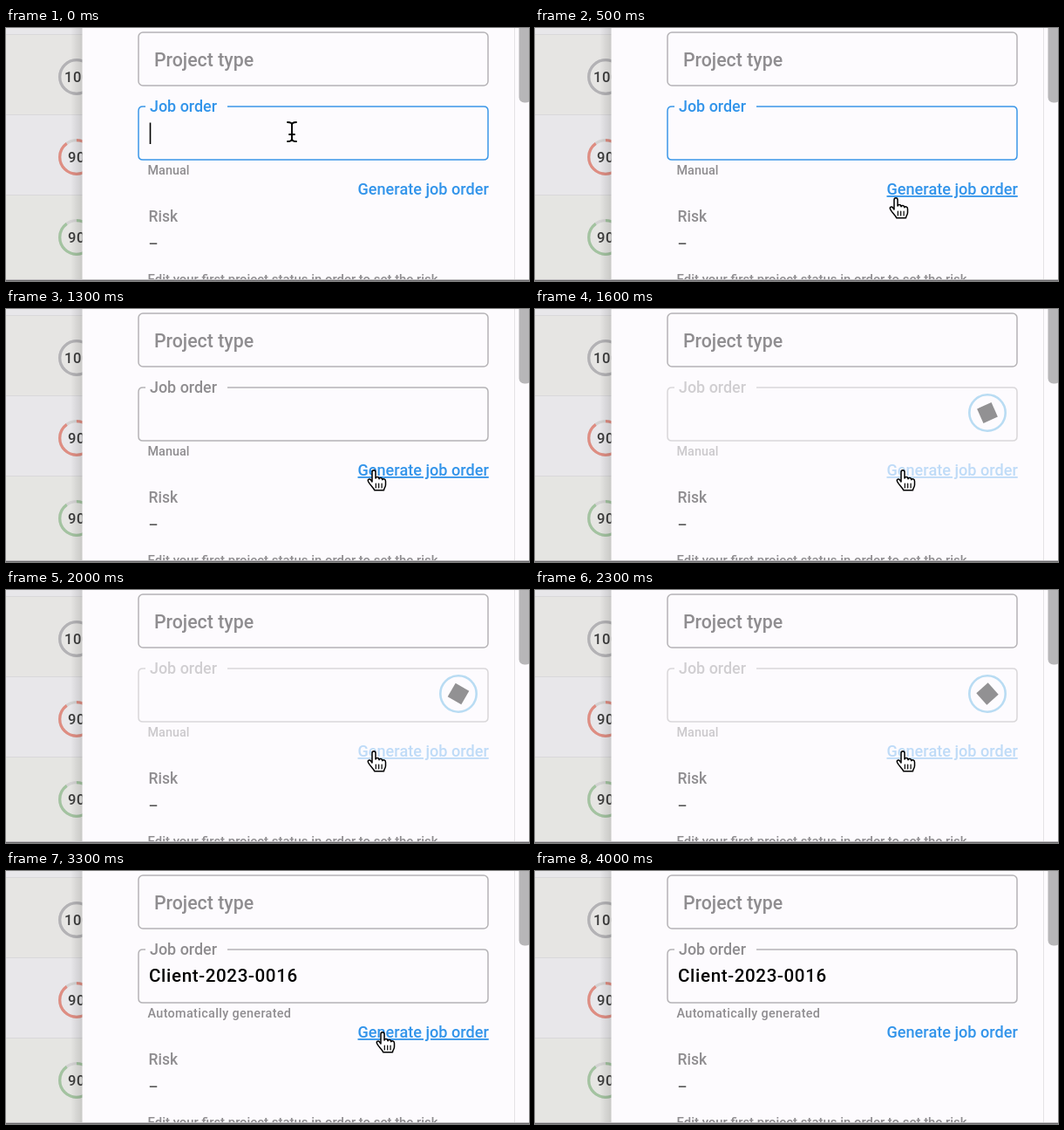
An HTML page that plays this animation: 600x290 px, repeating every 4.2 s.

```html
<!DOCTYPE html>
<html lang="en">
<head>
<meta charset="utf-8">
<title>Generate job order</title>
<style>
  html, body { margin: 0; width: 100%; height: 100%; overflow: hidden; background: #fdfbfe; }
  svg { display: block; width: 600px; height: 290px; font-family: Roboto, sans-serif; font-weight: 500; }
  text { white-space: pre; }
  .grey { fill: #8f8d90; }
  .box { fill: none; stroke: #b5b3b6; stroke-width: 1.5; }
  .ring { fill: none; stroke-width: 3.2; }
  .score { font-size: 16.5px; fill: #3c3c3c; letter-spacing: .6px; }
  #link { font-size: 18.1px; fill: #3294ea; text-decoration-thickness: 1.3px; text-underline-offset: 2px; }
  .focus #outline { stroke: #3b97e8; }
  .focus #label { fill: #3294ea; }
</style>
</head>
<body>
<svg viewBox="0 0 600 290">
  <defs>
    <linearGradient id="shade">
      <stop offset="0" stop-color="#000" stop-opacity="0"/>
      <stop offset="1" stop-color="#000" stop-opacity=".13"/>
    </linearGradient>
  </defs>

  <rect width="88" height="290" fill="#e8e7ea"/>
  <rect y="7" width="88" height="92" fill="#e6e5e3"/>
  <rect y="192" width="88" height="98" fill="#e5e5e2"/>
  <path d="M0 7.5H88M0 99.5H88M0 191.5H88" stroke="#d9d8da"/>
  <g id="scores"></g>
  <rect x="74" width="14" height="290" fill="url(#shade)"/>

  <rect x="87.5" width="513" height="290" fill="#fdfbfe"/>
  <path d="M583.5 0V290" stroke="#e4e2e5"/>
  <rect x="588.5" y="-10" width="14" height="95.5" rx="6" fill="#b7b6b8"/>

  <rect class="box" x="152" y="5" width="401" height="61" rx="5"/>
  <text class="grey" x="170" y="44" font-size="21.3">Project type</text>

  <g id="field">
    <path id="outline" class="box" d="M160 90H157Q152 90 152 95V146Q152 151 157 151H548Q553 151 553 146V95Q553 90 548 90H254"/>
    <text id="label" class="grey" x="165" y="95.5" font-size="17.9">Job order</text>
    <path id="caret" d="M165.5 108.5V133" stroke="#000" stroke-width="1.6"/>
    <text id="value" x="164" y="127" font-size="20.6" letter-spacing=".65">Client-2023-0016</text>
  </g>
  <text id="helper" class="grey" x="162.5" y="168" font-size="14.4"></text>
  <text id="link" x="403.5" y="191">Generate job order</text>

  <g id="spinner" transform="translate(519 119)">
    <circle r="20.7" fill="none" stroke="#b9dcf3" stroke-width="2.6"/>
    <rect id="mark" x="-9" y="-9" width="18" height="18" fill="#929193"/>
  </g>

  <text class="grey" x="163.5" y="222" font-size="17.5">Risk</text>
  <text x="163.5" y="253" font-size="17" fill="#555">–</text>
  <text class="grey" x="162.5" y="293" font-size="14.9">Edit your first project status in order to set the risk</text>
  <rect y="288" width="600" height="1" fill="#bdbbbe"/>
  <rect y="289" width="600" height="1" fill="#69686a"/>

  <g id="cursors" stroke-linejoin="round" stroke-linecap="round">
    <g id="beam" fill="none">
      <path d="M-5 -11Q0 -11 0 -8Q0 -11 5 -11M0 -8V8M-5 11Q0 11 0 8Q0 11 5 11M-3 3H3" stroke="#fff" stroke-width="4"/>
      <path d="M-5 -11Q0 -11 0 -8Q0 -11 5 -11M0 -8V8M-5 11Q0 11 0 8Q0 11 5 11M-3 3H3" stroke="#000" stroke-width="1.9"/>
    </g>
    <path id="arrow" d="M0 0V17L4 13.3L6.8 19.5L9.6 18.2L6.9 12.2H12.2Z" stroke="#fff" stroke-width="1.4"/>
    <g id="hand" stroke="#000" stroke-width="1.5">
      <path fill="#fff" d="M-2 2C-2 -1 2 -1 2 2V9C2.5 7 6 7 6 9.7C6.5 8 9.8 8 9.8 10.8C10.5 9.3 13.5 9.5 13.5 12.5V16.5C13.5 19.5 11.5 20 11.5 22.7H.8C0 20 -4.7 16.5 -6.4 12.7C-7.5 10 -4.7 9 -3.4 11L-2 13Z"/>
      <path d="M2.3 15V20M5.7 15V20M9.1 15V20" stroke-width="1.2"/>
    </g>
  </g>
</svg>

<script>
const LOOP = 4200, STEP = 100;
const el = id => document.getElementById(id);

// Cursor poses: [step, shape, x, y]; positions are interpolated linearly between rows.
const path = [
  [0, 'beam', 328, 119], [1, 'beam', 333, 124], [2, 'beam', 349, 141],
  [3, 'arrow', 372, 168], [4, 'arrow', 399, 198], [5, 'hand', 414, 195],
  [6, 'hand', 419, 188], [8, 'hand', 421, 179], [10, 'hand', 421, 179],
  [12, 'hand', 422, 185], [32, 'hand', 422, 185], [33, 'hand', 432, 185],
  [34, 'hand', 456, 184], [35, 'hand', 488, 182], [36, 'hand', 520, 179],
  [37, '', 540, 176], [42, '', 540, 176]
];

const scores = [['100', -14, 56, '#b3b2b5', 1], ['90', -10, 148, '#df8d82', .9], ['90', -10, 240, '#a3c3a0', .9]];
el('scores').innerHTML = scores.map(([text, x, y, color, part]) => `
  <g transform="translate(81 ${y})">
    <circle class="ring" r="19.3" stroke="#d3d2d2"/>
    <circle class="ring" r="19.3" stroke="${color}" pathLength="100"
      stroke-dasharray="${part * 100} 100" transform="rotate(-90)"/>
    <text class="score" x="${x}" y="6">${text}</text>
  </g>`).join('');

const show = (id, on) => { el(id).style.display = on ? '' : 'none'; };
const clamp = v => Math.min(1, Math.max(0, v));

function drawCursor(n) {
  const i = path.findIndex((row, k) => k === path.length - 1 || n < path[k + 1][0]);
  const [start, shape, x, y] = path[i];
  const [end, , nextX, nextY] = path[Math.min(i + 1, path.length - 1)];
  const p = end > start ? (n - start) / (end - start) : 0;
  el('cursors').setAttribute('transform', `translate(${x + (nextX - x) * p} ${y + (nextY - y) * p})`);
  for (const id of ['beam', 'arrow', 'hand']) show(id, id === shape);
  el('link').style.textDecoration = shape === 'hand' ? 'underline' : 'none';
}

function render(time) {
  const n = Math.floor((time % LOOP) / STEP);
  const focused = n < 12, done = n >= 25;
  const busy = done ? 0 : clamp((n - 13) / 3);

  el('field').classList.toggle('focus', focused);
  show('caret', focused && (n < 3 || n > 7));
  show('value', done);
  show('spinner', busy > 0);

  const helper = el('helper');
  helper.textContent = done ? 'Automatically generated' : 'Manual';
  helper.style.letterSpacing = done ? '.33px' : '0';

  el('outline').style.opacity = 1 - .5 * busy;
  el('label').style.opacity = 1 - .6 * busy;
  helper.style.opacity = 1 - .55 * busy;
  el('link').style.opacity = 1 - .7 * busy;
  el('spinner').style.opacity = busy;
  el('mark').setAttribute('transform', `rotate(${30 + (n - 20) * 36})`);
  drawCursor(n);
}

const begin = performance.now();
function tick() {
  render(performance.now() - begin);
  requestAnimationFrame(tick);
}
tick();
</script>
</body>
</html>
```
